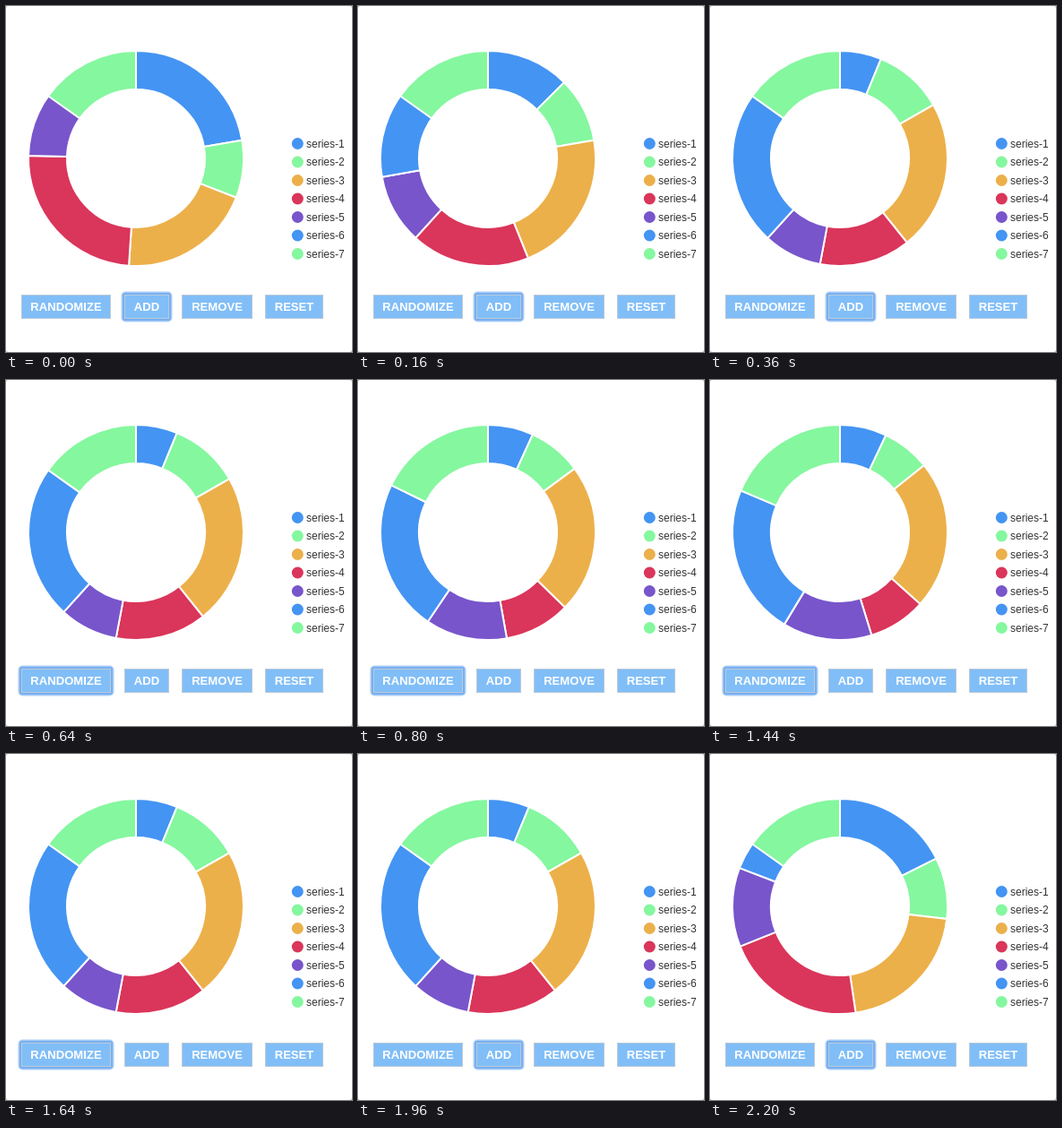
An HTML page for the animation above (2240 ms loop, 386 px wide and 386 px high).

```html
<!DOCTYPE html>
<html lang="en">
<head>
<meta charset="utf-8">
<style>
  html, body { margin: 0; width: 100%; height: 100%; overflow: hidden; background: #c4c4c4; }
  svg { display: block; width: 386px; height: 386px; }
  text { font-family: "Liberation Sans", Arial, sans-serif; }
  .label { font-size: 12px; fill: #333; }
  .caption { font-size: 13.1px; font-weight: bold; fill: #fff; text-anchor: middle; }
  .button { fill: #81bef7; stroke: #b9c9d9; }
  .halo { fill: none; stroke: #a9cdf8; stroke-width: 4; }
  .ring { fill: none; stroke: #78aff0; stroke-width: 2; }
  .slice { stroke: #fff; stroke-width: 2; stroke-linejoin: round; }
</style>
</head>
<body>
<svg viewBox="0 0 386 386"><rect width="386" height="386" rx="3" fill="#fff"/></svg>
<script>
const svg = document.querySelector('svg');
const COLORS = ['#4494f3', '#85f79f', '#ecb04a', '#da355a', '#7855cb', '#4494f3', '#85f79f'];
const CX = 145, CY = 170, OUTER = 120, INNER = 77;
const STEP = 40, STEPS = 56, TURN = 57, MOVE = 250;
const ADD_AT = 8, FOCUS_AT = 600, SHUFFLE_AT = 682;

// End angle in degrees of each slice but the last
const SIX = [80.3, 111.4, 183.8, 271.4, 318.7, 360];
const SEVEN = [22.4, 60.2, 141.5, 190.7, 222.2, 305.4];
const SHUFFLED = [27, 46.3, 126.1, 146.7, 204.8, 285.5];

function add(tag, attrs, parent = svg, text = '') {
  const el = document.createElementNS('http://www.w3.org/2000/svg', tag);
  for (const key in attrs) el.setAttribute(key, attrs[key]);
  el.textContent = text;
  return parent.appendChild(el);
}

const slices = COLORS.map(fill => add('path', { class: 'slice', fill }));

COLORS.forEach((fill, i) => {
  const y = 153.5 + 20.5 * i;
  add('circle', { cx: 325.3, cy: y, r: 6.5, fill });
  add('text', { class: 'label', x: 335, y: y + 4.3 }, svg, `series-${i + 1}`);
});

function addButton(name, x, width) {
  const focus = add('g', {});
  const frame = (cls, grow, rx) => add('rect', {
    class: cls, x: x - grow, y: 322 - grow, width: width + 2 * grow, height: 27 + 2 * grow, rx
  }, focus);
  frame('halo', 1.5, 3);
  frame('ring', 1, 2);
  add('rect', { class: 'button', x: x + 0.5, y: 322.5, width: width - 1, height: 26 });
  add('text', { class: 'caption', x: x + width / 2, y: 340.2 }, svg, name);
  return focus;
}

const randomizeFocus = addButton('RANDOMIZE', 17, 100);
const addFocus = addButton('ADD', 132, 50);
for (const args of [['REMOVE', 196, 79], ['RESET', 289, 65]])
  addButton(...args).setAttribute('visibility', 'hidden');

function point(radius, degrees) {
  const a = degrees * Math.PI / 180;
  return `${(CX + radius * Math.sin(a)).toFixed(2)} ${(CY - radius * Math.cos(a)).toFixed(2)}`;
}

function slicePath(from, to) {
  const large = to - from > 180 ? 1 : 0;
  return `M${point(OUTER, from)}A${OUTER} ${OUTER} 0 ${large} 1 ${point(OUTER, to)}` +
    `L${point(INNER, to)}A${INNER} ${INNER} 0 ${large} 0 ${point(INNER, from)}Z`;
}

const progress = (t, start) => Math.min(1, Math.max(0, (t - start) / MOVE));
const mix = (a, b, p) => a.map((v, i) => v + (b[i] - v) * p);

function draw(t) {
  const ends = t < FOCUS_AT
    ? mix(SIX, SEVEN, progress(t, ADD_AT))
    : mix(SEVEN, SHUFFLED, progress(t, SHUFFLE_AT));
  slices.forEach((slice, i) => {
    let from = i ? ends[i - 1] : 0;
    // The new slice appears in place and covers its neighbours
    if (i === 6) from = Math.min(from, SEVEN[5]);
    slice.setAttribute('d', slicePath(from, i < 6 ? ends[i] : 360));
  });
  const shuffled = t >= FOCUS_AT;
  randomizeFocus.setAttribute('visibility', shuffled ? 'visible' : 'hidden');
  addFocus.setAttribute('visibility', shuffled ? 'hidden' : 'visible');
}

// Plays forward, then back, in steps
const begin = performance.now();
function tick() {
  const step = Math.floor((performance.now() - begin) / STEP) % STEPS;
  draw(Math.min(step, TURN - step) * STEP);
  requestAnimationFrame(tick);
}
tick();
</script>
</body>
</html>
```
